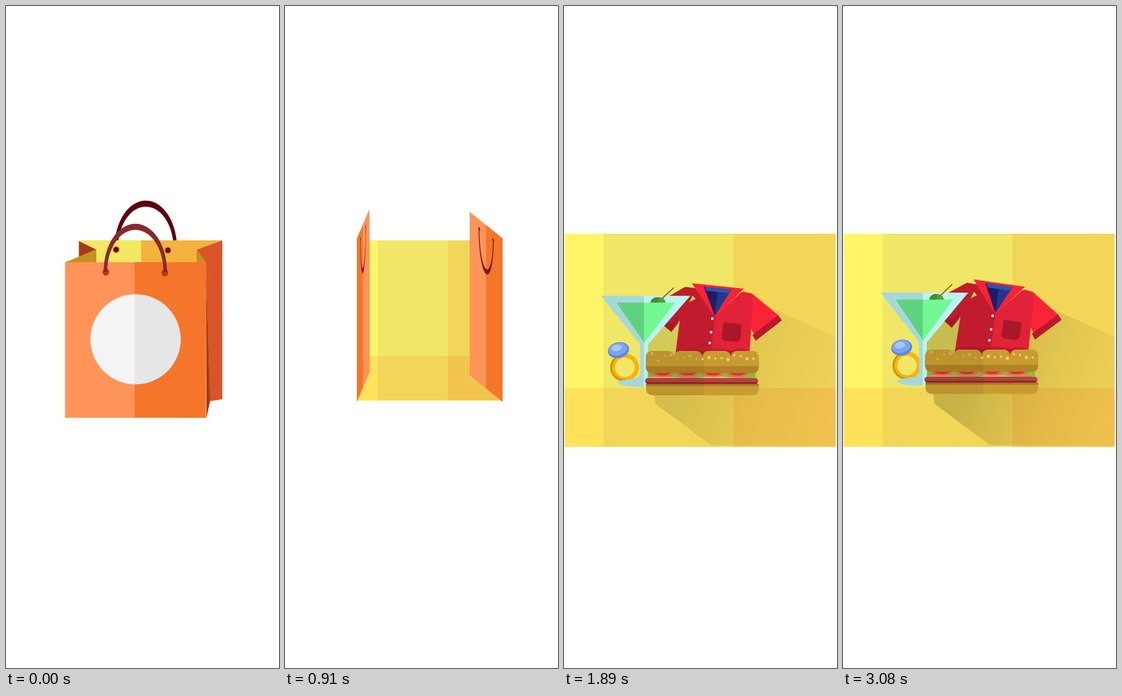
An HTML page for the animation above (3.15 s loop, 414 px wide and 1000 px high).

```html
<!DOCTYPE html>
<html lang="en">
<head>
<meta charset="utf-8">
<title>Shopping bag</title>
<style>
  html, body { margin: 0; width: 100%; height: 100%; overflow: hidden; background: #fff; }
  svg { display: block; width: 100vw; height: 100vh; }
</style>
</head>
<body>
<svg viewBox="0 0 414 1000">
  <defs>
    <clipPath id="bagClip"><rect id="bagCut" x="60" y="280" width="300" height="342"/></clipPath>
    <linearGradient id="shade" gradientUnits="userSpaceOnUse" x1="190" y1="550" x2="400" y2="630">
      <stop offset="0" stop-color="#6b6420" stop-opacity=".32"/>
      <stop offset=".55" stop-color="#7a6420" stop-opacity=".14"/>
      <stop offset="1" stop-color="#8a6420" stop-opacity=".05"/>
    </linearGradient>
    <g id="door">
      <path fill="#f5762a" d="M0 0H51V247H0z"/>
      <path fill="#ff9459" d="M50 0H100V247H50z"/>
      <path id="doorHandle" fill="#7a1a25"/>
      <circle cx="29" cy="14" r="2.5" fill="#7a1a25"/>
      <circle cx="71" cy="14" r="2.5" fill="#7a1a25"/>
    </g>
  </defs>

  <g id="bag" clip-path="url(#bagClip)">
    <path id="backHandle" fill="#5e0010"/>
    <path fill="#f2e863" d="M110 354H206V388H137V368z"/>
    <path fill="#f4b33f" d="M205 354H328L289 368V388H205z"/>
    <path fill="#a73c14" d="M110.500 355L137 368L110.500 379z"/>
    <path fill="#c8901f" d="M90 387L137 368V387zM289 368L303.500 387H289z"/>
    <path fill="#d95527" d="M328 354V594L309 597L303 387L289 368z"/>
    <path fill="#a73c14" d="M303 387L309.500 597L304 622z"/>
    <path fill="#ff9459" d="M89.500 387H196V622H89.500z"/>
    <path fill="#f5762a" d="M195 387H303.500V622H195z"/>
    <g fill="#660012" stroke="#c87a2c" stroke-width="1.500">
      <circle cx="167" cy="368" r="4.500"/><circle cx="245.500" cy="369" r="4.500"/>
    </g>
    <g fill="#b0401c">
      <circle cx="151.500" cy="402" r="5.200"/><circle cx="241" cy="403" r="5.200"/>
    </g>
    <path id="frontHandle" fill="#872a30"/>
    <g id="disc">
      <path fill="#f4f4f4" d="M196 435.500A68 68 0 0 0 196 571.500z"/>
      <path fill="#e6e6e6" d="M195.500 435.500H197A68 68 0 0 1 197 571.500H195.500z"/>
    </g>
  </g>

  <g id="flap">
    <path id="flapSide" fill="#f5762a"/>
    <path id="flapEdge" fill="#f2e863"/>
    <path id="flapDark" fill="#f5762a"/>
    <path id="flapLight" fill="#ff9459"/>
    <path id="flapShade"/>
  </g>

  <g id="room" shape-rendering="crispEdges">
    <path fill="#f0e766" d="M0 0H100V100H0z"/>
    <path fill="#fff566" d="M0 0H14.300V100H0z"/>
    <path fill="#f2d658" d="M62.400 0H100V100H62.400zM0 72.400H100V100H0z"/>
    <path fill="#ffe25a" d="M0 72.400H14.300V100H0z"/>
    <path fill="#f3c54e" d="M62.400 72.400H100V100H62.400z"/>
  </g>
  <use id="leftDoor" href="#door"/>
  <use id="rightDoor" href="#door"/>

  <path id="shadow" fill="url(#shade)" d="M136 584L139 601L223 663.500H412.500V500L318 458L190 435L127 508V584z"/>

  <g id="goods">
    <g id="shirt">
      <path fill="#bf1c2e" d="M188 418L205 421L175 474L165 486L154 476L164 450L160 433z"/>
      <path fill="#a81829" d="M203 437L177 466L165 486L154 476L157 470L164 474z"/>
      <path fill="#fb2436" d="M274 428L288 432L327 467L289 494L283 482z"/>
      <path fill="#b81b2d" d="M326 466L331.500 474L291 504L286.500 495z"/>
      <path fill="#c01c2e" d="M188 419L204 421L232 464L225 532H168L178 470L173 452L203 437z"/>
      <path fill="#e22238" d="M231 465L272 429L288 432L289 446L280 532H222z"/>
      <path fill="#f92336" d="M198 413L276 424L231 466z"/>
      <path fill="#1f1d66" d="M216 419L238 422L231 464z"/>
      <path fill="#23388c" d="M237 421.500L257 425L231 464z"/>
      <path fill="#2b55b0" d="M218 419.500L257 424.500L253 430L219 425z"/>
      <path fill="#a81829" d="M244 474L271 478L268.500 498Q267 505 261 504.500L246 502.500Q239.500 501 240.500 495z"/>
      <g fill="#fff"><circle cx="227" cy="468" r="2"/><circle cx="224.500" cy="488.500" r="2"/><circle cx="222" cy="505" r="2"/></g>
      <path fill="#8f1424" opacity=".45" d="M171 519Q190 510 213 518Q232 511 254 518Q268 512 281 520L280 532H168z"/>
    </g>
    <g id="ring">
      <circle cx="97" cy="543" r="18" fill="none" stroke="#f5b50e" stroke-width="6.500"/>
      <path fill="none" stroke="#d2920c" stroke-width="3" d="M86 526A20 20 0 0 0 97 563"/>
      <g transform="rotate(-10 89 516)">
        <ellipse cx="89" cy="516" rx="16" ry="12" fill="#5b86e2"/>
        <ellipse cx="88.500" cy="514.500" rx="14" ry="9.500" fill="#79a4f5"/>
        <ellipse cx="87" cy="512" rx="8" ry="5" fill="#a6c6fb"/>
      </g>
    </g>
    <g id="glass">
      <path fill="#a5d8dc" d="M57 433H122V573Q92 575 81 567C82 560 115 565 115.500 553V508z"/>
      <path fill="#baf3f0" d="M121 433H190L127 508V573H121z"/>
      <path fill="#5fd27e" d="M80 443.500H122V506z"/>
      <path fill="#72f992" d="M121 443.500H167L121 506z"/>
      <path fill="none" stroke="#8a4a2a" stroke-width="1.600" d="M146 439L165.500 420.500"/>
      <path fill="#5a9a3a" d="M131 443.500A11 8.500 0 0 1 153 443.500z"/>
      <path fill="#4a8732" d="M131 443.500A11 8.500 0 0 1 142 435V443.500z"/>
    </g>
    <g id="sandwich">
      <path fill="#8fb83a" d="M128 549H291V559Q270 562 250 559T210 559T170 559T128 559z"/>
      <g id="tomatoes"></g>
      <rect x="123.500" y="560" width="171.500" height="9" rx="4.500" fill="#bb3f42"/>
      <path fill="#8f2a30" d="M126 566H293V569H126z"/>
      <path fill="#c99c31" d="M125 569H296V575Q296 586 285 586H136Q125 586 125 575z"/>
      <path fill="#a97c22" d="M125 569H296V572H125z"/>
      <path fill="#b28324" d="M124.500 536H296V543Q296 552.500 286 552.500H134Q124.500 552.500 124.500 543z"/>
      <g id="bun" fill="#c99c31"></g>
      <path fill="#000" opacity=".06" d="M213 521V586H136Q125 586 125 575V569L123.500 565L128 552Q124.500 549 124.500 543V528Q124.500 519 134 519H205z"/>
      <g id="seeds"></g>
    </g>
  </g>
</svg>
<script>
const LOOP = 3150, STEP = 70;
const el = id => document.getElementById(id);
const set = (id, name, value) => el(id).setAttribute(name, value);
const show = (id, on) => set(id, 'visibility', on ? 'visible' : 'hidden');
const mix = (a, b, p) => a + (b - a) * p;
const mixPoint = (a, b, p) => [mix(a[0], b[0], p), mix(a[1], b[1], p)];
const ramp = (t, from, to) => Math.min(1, Math.max(0, (t - from) / (to - from)));
const smooth = (t, from, to) => (1 - Math.cos(Math.PI * ramp(t, from, to))) / 2;

// Tapered arch over two feet; (lean, rise) is the vector to its apex.
function arch(cx, y, half, lean, rise) {
  const at = (u, v) => `${cx + half * u + lean * v} ${y - rise * v}`;
  const k = 0.56, w = 0.89, h = 0.875;
  return `M${at(-1, 0)}C${at(-1, k)} ${at(-k, 1)} ${at(0, 1)}C${at(k, 1)} ${at(1, k)} ${at(1, 0)}` +
    `L${at(w, 0)}C${at(w, k * h)} ${at(k * w, h)} ${at(0, h)}C${at(-k * w, h)} ${at(-w, k * h)} ${at(-w, 0)}Z`;
}

// Each item shifts [x, y], turns and squashes about its pivot.
const ITEMS = {
  shirt: { pivot: [225, 525], land: [0, 7, -1, 0.03], sway: [-0.5, 0.5, -2.9, -0.01] },
  ring: { pivot: [97, 564], land: [-5, 6, -1.8, 0.03], sway: [-2, -1, -5, 0] },
  glass: { pivot: [121, 573], land: [-2, 4, 0, 0.04], sway: [2.5, 0, 0, 0] },
  sandwich: { pivot: [210, 586], land: [0, 4, 0, 0.03], sway: [-1, 0, 0, -0.03] }
};

function buildSandwich() {
  let seed = 7;
  const random = () => (seed = seed * 16807 % 2147483647) / 2147483647;
  const repeat = (n, part) => Array.from({ length: n }, (_, i) => part(i)).join('');
  el('bun').innerHTML = '<path d="M124.500 530H296V542H124.500z"/>' +
    repeat(4, i => `<rect x="${124.5 + i * 42.9}" y="519" width="42.9" height="20" rx="9"/>`);
  el('tomatoes').innerHTML = repeat(4, i =>
    `<ellipse cx="${150 + i * 38}" cy="553" rx="17" ry="5.500" fill="#f4675c"/>` +
    `<ellipse cx="${150 + i * 38}" cy="552" rx="12" ry="4" fill="#d9322e"/>`);
  el('seeds').innerHTML = repeat(17, i =>
    `<circle cx="${134 + i * 9.6}" cy="${523 + random() * 11}" r="${i % 3 ? 1.8 : 2.5}" fill="${i < 8 ? '#d0a744' : '#f0cf6c'}"/>`);
}

function drawBag(t, fold) {
  const turn = fold * Math.PI * 1.1;
  const lean = 78 * Math.sin(turn), rise = 73 * Math.cos(turn);
  set('backHandle', 'd', arch(212, 367, 47.5, lean, rise));
  set('frontHandle', 'd', arch(196.2, 402, 48, lean, rise));
  set('disc', 'opacity', 1 - ramp(t, 0, 140));
  set('bagCut', 'height', 342 - 176 * fold);
}

// The panel rises from the bottom of the bag and swings out on the way.
function drawFlap(fold) {
  const out = Math.sin(Math.PI * fold);
  const tl = [90 + 19 * fold * fold, 622 - 270 * fold + 20 * out];
  const tr = [304 + 26 * fold + 8 * out, tl[1] - 8 * out];
  const bl = [tl[0] + 31 * out, 622 - 24 * fold - 23 * out];
  const br = [tr[0] + 26 * out, bl[1] - 6 * out];
  const edgeL = [bl[0] - 10 * out, bl[1] + 7 * out];
  const edgeR = [br[0] - 8 * out, br[1] + 7 * out];
  const poly = (...points) => `M${points.join('L')}Z`;
  const face = `M${tl}L${mixPoint(tl, tr, 0.97)}Q${tr} ${mixPoint(tr, br, 0.15)}L${br}L${bl}Z`;
  set('flapSide', 'd', poly(tl, bl, edgeL));
  set('flapEdge', 'd', poly(bl, br, edgeR, edgeL));
  set('flapDark', 'd', face);
  set('flapLight', 'd', poly(tl, mixPoint(tl, tr, 0.54), mixPoint(bl, br, 0.515), bl));
  set('flapShade', 'd', face);
  set('flapShade', 'opacity', 0.085 * out);
}

function drawRoom(t) {
  const grow = 1 - (1 - ramp(t, 980, 1540)) ** 4;
  const left = mix(109, 1, grow), right = mix(330, 412, grow);
  const top = mix(354, 344, grow), height = mix(242, 321.5, grow);
  set('room', 'transform', `matrix(${(right - left) / 100} 0 0 ${height / 100} ${left} ${top})`);

  const swing = ramp(t, 770, 910) + 0.45 * ramp(t, 980, 1190);
  const door = (id, side, x, degrees) => {
    const a = swing * degrees * Math.PI / 180;
    set(id, 'transform', `matrix(${side * 1.1 * Math.cos(a)} ${-0.45 * Math.sin(a)} 0 ${height / 242} ${x} ${top - 3})`);
  };
  door('leftDoor', 1, left, 80);
  door('rightDoor', -1, right, 63);
}

function drawGoods(t) {
  set('goods', 'opacity', ramp(t, 1120, 1540));
  set('shadow', 'opacity', ramp(t, 1190, 2240));
  const arrive = smooth(t, 1190, 1540), settle = smooth(t, 1540, 2240);
  const landing = arrive - settle, swaying = settle - smooth(t, 2240, 3080);
  const zoom = mix(0.84, 1, arrive);
  for (const [id, { pivot: [px, py], land, sway }] of Object.entries(ITEMS)) {
    const [x, y, turn, squash] = land.map((v, i) => v * landing + sway[i] * swaying);
    set(id, 'transform', `translate(190 548) scale(${zoom}) translate(${px + x - 190} ${py + y - 548}) ` +
      `rotate(${turn}) scale(${1 + squash} ${1 - squash}) translate(${-px} ${-py})`);
  }
}

function draw() {
  const t = Math.floor(performance.now() % LOOP / STEP) * STEP;
  const fold = ramp(t, 210, 770), open = t >= 840;
  show('bag', !open);
  show('flap', !open && fold > 0);
  show('room', open);
  show('leftDoor', open && t < 1190);
  show('rightDoor', open && t < 1190);
  drawBag(t, fold);
  drawFlap(fold);
  drawRoom(t);
  drawGoods(t);
  requestAnimationFrame(draw);
}

set('doorHandle', 'd', arch(50, 13, 23, 0, -61));
buildSandwich();
draw();
</script>
</body>
</html>
```
